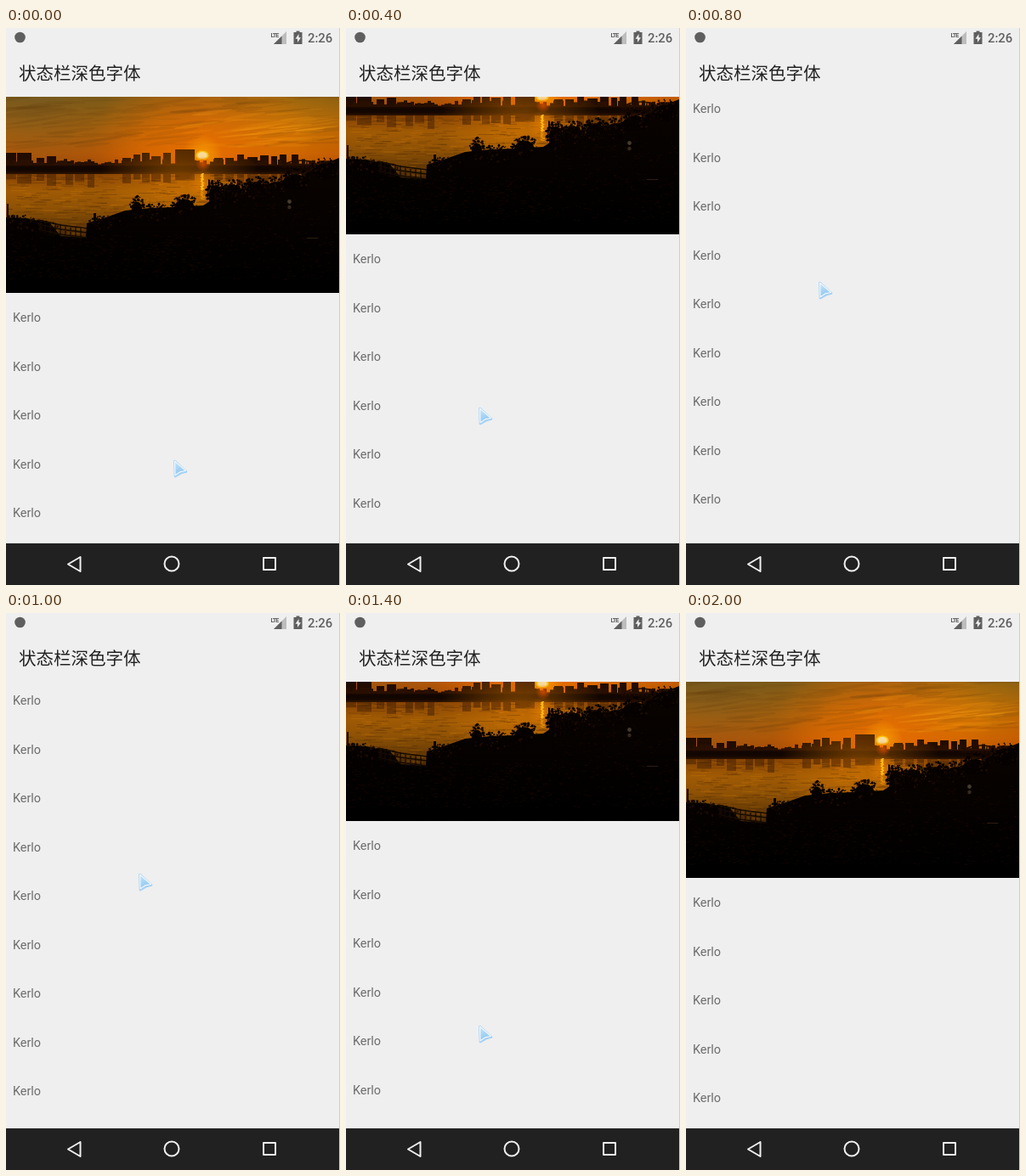
These frames come from a looping animation (393 px wide and 656 px high, 2.6 s). An HTML page with a canvas:

```html
<!DOCTYPE html>
<html lang="zh-CN">
<head>
<meta charset="utf-8">
<title>状态栏深色字体</title>
<style>
html, body { margin: 0; width: 100%; height: 100%; overflow: hidden; background: #efefef; }
#stage { position: absolute; left: 0; top: 0; width: 393px; height: 656px; overflow: hidden; background: #efefef; }
#stage > * { position: absolute; }
h1 { margin: 0; left: 15px; top: 37px; font: 400 20.5px/30px "Noto Sans CJK SC", "Noto Sans CJK", sans-serif; color: #212121; white-space: nowrap; }
#view { left: 0; top: 81px; width: 392px; height: 526px; overflow: hidden; }
#page { animation: scroll 2.6s step-end infinite; }
canvas { display: block; }
.row { height: 57.5px; padding-left: 8px; font: 14.4px/59px Roboto, sans-serif; color: #6c6c6c; }
#edge { left: 392px; top: 0; width: 1px; height: 656px; background: #cfcfcf; }
#cursor { left: 0; top: 0; animation: pointer 2.6s step-end infinite; }
@keyframes scroll {
  0%, 7.69% { transform: translateY(0); }
  15.38% { transform: translateY(-69px); }
  23.07% { transform: translateY(-168px); }
  30.76% { transform: translateY(-246px); }
  38.46% { transform: translateY(-238px); }
  46.15% { transform: translateY(-156px); }
  53.84% { transform: translateY(-67px); }
  61.53%, 100% { transform: translateY(0); }
}
@keyframes pointer {
  0% { transform: translate(196px, 508px); }
  7.69% { transform: translate(152px, 543px); }
  15.38% { transform: translate(155px, 446px); }
  23.07% { transform: translate(155px, 345px); }
  30.76% { transform: translate(155px, 298px); }
  38.46% { transform: translate(155px, 306px); }
  46.15% { transform: translate(155px, 393px); }
  53.84% { transform: translate(155px, 485px); }
  61.53% { transform: translate(152px, 546px); }
  69.23% { transform: translate(151px, 566px); }
  76.92%, 100% { transform: translate(-40px, 0); }
}
</style>
</head>
<body>
<div id="stage">
  <h1>状态栏深色字体</h1>
  <div id="view"><div id="page"><canvas id="photo" width="392" height="231"></canvas></div></div>
  <svg width="393" height="656">
    <g fill="#5f5f5f">
      <circle cx="16.5" cy="11" r="6.3"/>
      <text x="311.5" y="10.500" font-family="Roboto, sans-serif" font-size="7.2" font-weight="700" letter-spacing="-.9">LTE</text>
      <path d="M330 4V19H315Z" fill="#bdbdbd"/>
      <path d="M324.500 9.500V19H315Z"/>
      <path d="M341.500 4V3.500H345.500V5H348.500V19H338.500V5H341.500Z"/>
      <path d="M344.500 7L340.500 12.800H343V17L347 11.200H344.500Z" fill="#efefef"/>
      <text x="355" y="17" font-family="Roboto, sans-serif" font-size="14.8" font-weight="500">2:26</text>
    </g>
    <rect y="606" width="392" height="1" fill="#dde0df"/>
    <rect y="607" width="392" height="49" fill="#212121"/>
    <g fill="none" stroke="#efefef" stroke-width="2" stroke-linejoin="round">
      <path d="M73 631.500L87.500 623V640Z"/>
      <circle cx="195" cy="631" r="8.500"/>
      <rect x="303" y="624" width="14" height="14"/>
    </g>
  </svg>
  <div id="edge"></div>
  <svg id="cursor" width="20" height="23">
    <defs>
      <linearGradient id="ice" x1="0" y1="0" x2="0.4" y2="1">
        <stop offset="0" stop-color="#c9e7fa"/>
        <stop offset="1" stop-color="#90c5ef"/>
      </linearGradient>
    </defs>
    <g stroke-linejoin="round">
      <path d="M2.500 2L16 14.500L10 16L3 20Z" fill="#9ccbf1" stroke="#a5d0f3" stroke-width="2.600"/>
      <path d="M2.500 2L15.500 13.500L9.500 14.600L3 18.800Z" fill="url(#ice)" stroke="#eff8fe" stroke-width="1.200"/>
    </g>
  </svg>
</div>
<script>
const page = document.getElementById('page');
for (let i = 0; i < 10; i++) {
  const row = document.createElement('div');
  row.className = 'row';
  row.textContent = 'Kerlo';
  page.append(row);
}

const ctx = document.getElementById('photo').getContext('2d');
let seed = 41;
const random = (lo = 0, hi = 1) => {
  seed = seed * 16807 % 2147483647;
  return lo + (hi - lo) * seed / 2147483647;
};
const rect = (color, x, y, w, h) => {
  ctx.fillStyle = color;
  ctx.fillRect(x, y, w, h);
};
const oval = (color, x, y, rx, ry = rx, turn = 0) => {
  ctx.fillStyle = color;
  ctx.beginPath();
  ctx.ellipse(x, y, rx, ry, turn, 0, 7);
  ctx.fill();
};
const fade = (y0, y1, ...colors) => {
  const g = ctx.createLinearGradient(0, y0, 0, y1);
  colors.forEach((c, i) => g.addColorStop(i / (colors.length - 1), c));
  return g;
};
const glow = (x, y, r, rgb, alpha) => {
  const g = ctx.createRadialGradient(x, y, 0, x, y, r);
  g.addColorStop(0, `rgba(${rgb},${alpha})`);
  g.addColorStop(1, `rgba(${rgb},0)`);
  oval(g, x, y, r);
};

function drawSky() {
  rect(fade(0, 88, '#7d5a14', '#9a5f0c', '#b46004', '#bf5700', '#a84500'), 0, 0, 392, 88);
  glow(30, 10, 150, '112,88,40', 0.5);
  glow(231, 66, 130, '255,112,0', 0.65);
  glow(330, 38, 110, '235,135,0', 0.4);
  for (let i = 0; i < 110; i++) {
    const x = random(0, 392), y = random(0, 58);
    const bright = x > 210 && y > 18 && random() < 0.7;
    oval(bright ? 'rgba(245,155,15,.17)' : 'rgba(92,58,15,.13)',
      x, y, random(12, 48), random(0.6, 2.4), random(-0.16, 0.03));
  }
  for (let i = 0; i < 7; i++)
    oval('rgba(250,165,20,.3)', 275 + i * 15, 43 - i * 1.5 + random(-4, 4), 26, 1, -0.1);
  glow(231, 69, 24, '255,170,0', 0.9);
  oval('#ffdc1a', 231, 69, 7.5, 5.5);
  oval('#fffbd0', 231, 69, 5.5, 4);
}

const buildings = [[0, 12, 66], [13, 17, 66], [36, 9, 72], [48, 11, 70], [70, 9, 76],
  [81, 11, 77], [96, 8, 76], [137, 10, 72], [150, 8, 68], [160, 9, 66], [171, 11, 70],
  [185, 9, 66], [199, 23, 62], [245, 10, 72], [258, 10, 72], [272, 8, 68], [284, 12, 71],
  [299, 10, 69], [312, 7, 70], [322, 8, 68], [336, 8, 68]];

function drawCity() {
  for (const [x, w, top] of buildings) rect('#210c00', x, top, w, 84 - top);
  for (let x = 0; x < 392; x += 4) {
    const h = random(2, 9);
    rect('#280f00', x, 82 - h, 4, h);
  }
  rect(fade(80, 92, '#1c0900', '#100500', '#160700', '#3a1900'), 0, 81, 392, 11);
  glow(232, 79, 9, '230,60,0', 0.75);
  ctx.strokeStyle = '#210c00';
  ctx.lineWidth = 1.5;
  ctx.beginPath();
  ctx.ellipse(347, 84, 22, 9, 0, Math.PI, 0);
  for (let x = 329; x < 368; x += 5) {
    ctx.moveTo(x, 84);
    ctx.lineTo(x, 84 - 9 * Math.sqrt(1 - ((x - 347) / 22) ** 2));
  }
  ctx.stroke();
}

function drawWater() {
  rect(fade(91, 170, '#874403', '#a05a04', '#8f5205', '#6b3d05', '#3c2204'), 0, 91, 392, 79);
  glow(205, 105, 95, '225,125,0', 0.5);
  for (const [x, w] of buildings) rect('rgba(45,18,0,.4)', x, 91, w, random(6, 16));
  for (let i = 0; i < 480; i++)
    rect(random() < 0.6 ? 'rgba(60,30,2,.25)' : 'rgba(235,145,15,.17)',
      random(0, 330), random(92, 165), random(4, 20), 1);
  glow(231, 103, 18, '255,140,0', 0.5);
  for (let y = 90; y < 121; y++) rect(y < 110 ? '#ffb814' : '#dd8a08', 229.5 + random(-1, 1), y, random(2, 4), 1);
}

const bush = (x, y, rx, ry, count) => {
  oval('#060200', x, y + 3, rx * 0.7, ry * 0.75);
  for (let i = 0; i < count; i++) {
    const a = random(0, 6.28), r = Math.sqrt(random());
    oval(random() < 0.8 ? '#070200' : '#1c0c00',
      x + Math.cos(a) * r * rx, y + Math.sin(a) * r * ry, random(0.5, 1.6));
  }
};

function drawShore() {
  const ground = [[0, 142], [24, 143], [52, 149], [64, 164], [94, 166], [95, 149], [112, 144],
    [140, 134], [170, 131], [195, 130], [232, 128], [246, 119], [274, 114], [302, 111], [324, 99],
    [350, 92], [374, 79], [392, 72], [392, 231], [0, 231]];
  ctx.fillStyle = fade(70, 231, '#0b0300', '#060200', '#030100', '#000');
  ctx.beginPath();
  ground.forEach(([x, y]) => ctx.lineTo(x, y));
  ctx.fill();
  bush(15, 148, 23, 9, 90);
  bush(44, 153, 17, 8, 70);
  bush(118, 149, 21, 9, 90);
  bush(154, 131, 9, 14, 90);
  bush(177, 137, 17, 12, 100);
  bush(210, 127, 16, 13, 130);
  bush(247, 114, 12, 17, 130);
  bush(268, 111, 15, 14, 140);
  bush(294, 108, 16, 14, 140);
  bush(316, 106, 13, 12, 100);
  bush(340, 97, 19, 12, 120);
  bush(376, 85, 18, 13, 120);
  for (let i = 0; i < 60; i++)
    rect('#0a0400', random(236, 322), 97 + random(0, 15), 1, 12);
  rect('#0a0400', 103, 137, 3, 15);
  rect('#120800', 1, 126, 2, 18);
  ctx.strokeStyle = '#150a00';
  ctx.lineWidth = 1.3;
  ctx.beginPath();
  for (const drop of [0, 5, 11]) {
    ctx.moveTo(38, 145 + drop);
    ctx.lineTo(64, 151 + drop);
    ctx.lineTo(95, 155 + drop);
  }
  for (let x = 40; x < 94; x += 6) {
    const y = 145 + (x - 38) * 0.18;
    ctx.moveTo(x, y);
    ctx.lineTo(x, y + 14);
  }
  ctx.stroke();
  for (let i = 0; i < 700; i++) {
    const x = random(0, 392), y = random(x > 240 ? 116 : 162, 215);
    rect('rgba(67,24,3,.2)', x, y, random(1, 5), 1);
  }
  oval('#453b2c', 333.5, 123.5, 2.4);
  oval('#342a1d', 333.5, 130, 2.2);
  rect('#2c1c10', 354, 166, 13, 1);
}

drawSky();
drawCity();
drawWater();
drawShore();
</script>
</body>
</html>
```
